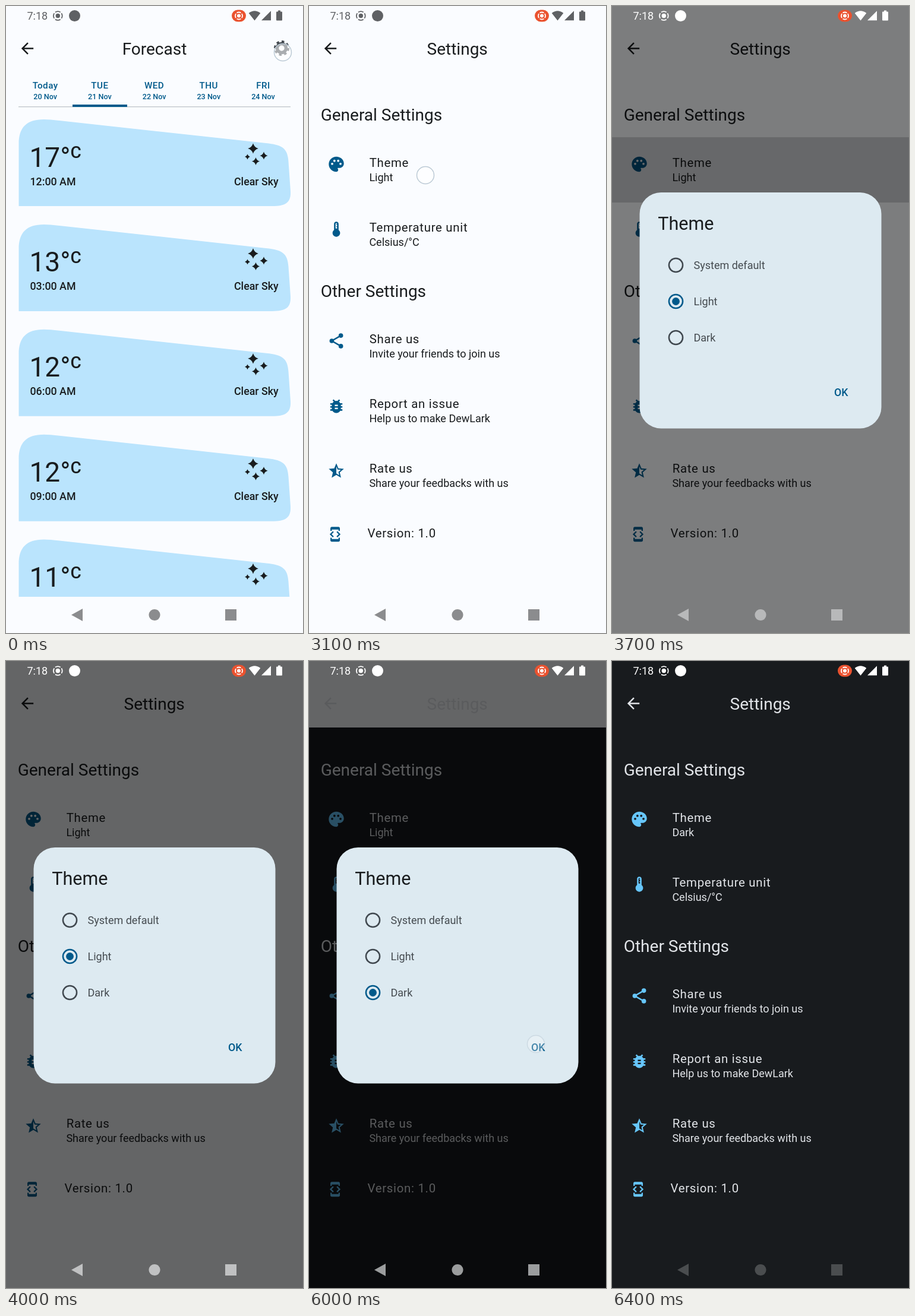
Animation, 500 px wide and 1056 px high, one loop 8 s. Source, as an HTML page:

```html
<!DOCTYPE html>
<html lang="en">
<head>
<meta charset="utf-8">
<title>Theme settings</title>
<style>
  html, body { margin: 0; width: 100%; height: 100%; overflow: hidden; }
  svg { display: block; width: 100vw; height: 100vh; background: var(--bg); font-family: Roboto, sans-serif; }
  .ink { fill: var(--ink); }
  .accent { fill: var(--accent); }
  .status { fill: var(--status); }
  .nav { fill: var(--nav); }
  .medium { font-weight: 500; }
  .title { font-size: 28px; }
  .item { font-size: 20.4px; letter-spacing: .7px; }
  .note { font-size: 18px; }
  .middle { text-anchor: middle; }
</style>
</head>
<body>
<svg id="stage" viewBox="0 0 500 1056"></svg>
<script>
const LOOP = 8000, STEP = 100;
const LIGHT = { bg: '#fafcff', ink: '#191c1e', accent: '#005a8b' };
const DARK = { bg: '#181b1e', ink: '#e1e4e8', accent: '#66c6fb' };

const text = (x, y, content, cls = 'ink', extra = '') =>
  `<text x="${x}" y="${y}" class="${cls}" ${extra}>${content}</text>`;
const circle = (x, y, r, extra = '') => `<circle cx="${x}" cy="${y}" r="${r}" ${extra}/>`;
const rect = (x, y, w, h, extra = '') => `<rect x="${x}" y="${y}" width="${w}" height="${h}" ${extra}/>`;
const dot = (x, y, r) => `M${x - r} ${y}a${r} ${r} 0 1 0 ${2 * r} 0a${r} ${r} 0 1 0 ${-2 * r} 0z`;
// Icons live on a 24 unit grid and are placed by their centre.
const icon = (d, x, y, cls = 'accent', scale = 1.273, extra = '') =>
  `<path class="${cls}" fill-rule="evenodd" transform="translate(${x} ${y}) scale(${scale}) translate(-12 -12)" d="${d}" ${extra}/>`;

const ICONS = {
  back: 'M20 11H7.83l5.59-5.59L12 4l-8 8 8 8 1.41-1.41L7.83 13H20z',
  palette: 'M12 2C6.49 2 2 6.49 2 12s4.49 10 10 10c1.38 0 2.5-1.12 2.5-2.5 0-.61-.23-1.2-.64-1.67-.08-.1-.13-.21-.13-.33 0-.28.22-.5.5-.5H16c3.31 0 6-2.69 6-6 0-4.96-4.49-9-10-9z' +
    dot(6.5, 11.5, 1.5) + dot(9.5, 7.5, 1.5) + dot(14.5, 7.5, 1.5) + dot(17.5, 11.5, 1.5),
  thermometer: 'M15 13V5c0-1.66-1.34-3-3-3S9 3.34 9 5v8c-1.21.91-2 2.37-2 4 0 2.76 2.24 5 5 5s5-2.24 5-5c0-1.63-.79-3.09-2-4zM11 5c0-.55.45-1 1-1s1 .45 1 1h-1v1h1v2h-1v1h1v2h-2z',
  share: dot(18, 5, 3) + dot(6, 12, 3) + dot(18, 19, 3),
  bug: 'M20 8h-2.81c-.45-.78-1.07-1.45-1.82-1.96L17 4.41 15.59 3l-2.17 2.17a6 6 0 0 0-2.83 0L8.41 3 7 4.41l1.62 1.63C7.88 6.55 7.26 7.22 6.81 8H4v2h2.09L6 11v1H4v2h2v1l.09 1H4v2h2.81a6 6 0 0 0 10.38 0H20v-2h-2.09L18 15v-1h2v-2h-2v-1l-.09-1H20zM14 16h-4v-2h4zM14 12h-4v-2h4z',
  star: 'M22 9.24l-7.19-.62L12 2 9.19 8.63 2 9.24l5.46 4.73L5.82 21 12 17.27 18.18 21l-1.63-7.03zM12 15.4V6.1l1.71 4.04 4.38.38-3.32 2.88 1 4.28z',
  version: 'M7 5h10v2h2V3c0-1.1-.9-2-2-2H7c-1.1 0-2 .9-2 2v4h2zM15.41 16.59L20 12l-4.59-4.59L14 8.83 17.17 12 14 15.17zM10 15.17L6.83 12 10 8.83 8.59 7.41 4 12l4.59 4.59zM17 19H7v-2H5v4c0 1.1.9 2 2 2h10c1.1 0 2-.9 2-2v-4h-2z'
};

function sparkle(x, y, r) {
  const c = r * .22;
  return `M${x} ${y - r}Q${x + c} ${y - c} ${x + r} ${y}Q${x + c} ${y + c} ${x} ${y + r}` +
    `Q${x - c} ${y + c} ${x - r} ${y}Q${x - c} ${y - c} ${x} ${y - r}z`;
}

function card([degrees, time], index) {
  const sparkles = sparkle(416, 240, 8.8) + sparkle(434, 252, 6.6) + sparkle(406.5, 254, 4.4) + sparkle(420.5, 261.5, 6.6);
  return `<g transform="translate(0 ${index * 176.9})">
    <path fill="#bae4fd" d="M21.5 337V232C21.5 205 34 191 64 191Q74 191 90 193L438 231C466 234 474 240 475.5 262L479 312C480 331 471 337 448 337z"/>
    ${text(39.5, 270.5, `${degrees}°<tspan font-size="28" class="medium" dy="-14.5">C</tspan>`, 'ink', 'font-size="46"')}
    ${text(40.5, 301.5, time, 'ink medium', 'font-size="17.8"')}
    <path class="ink" d="${sparkles}"/>
    ${text(458.7, 301.5, 'Clear Sky', 'ink medium', 'font-size="17.8" text-anchor="end"')}
  </g>`;
}

function forecastScreen() {
  const tabs = ['Today', 'TUE', 'WED', 'THU', 'FRI'].map((day, i) => {
    const x = 66.2 + i * 91.7;
    return text(x, 138.5, day, 'accent medium middle', 'font-size="15.2" letter-spacing=".5"') +
      text(x, 156.5, `${20 + i} Nov`, 'accent medium middle', 'font-size="12.6"');
  }).join('');
  const cards = [[17, '12:00 AM'], [13, '03:00 AM'], [12, '06:00 AM'], [12, '09:00 AM'], [11, '12:00 PM']];
  return text(250, 82, 'Forecast', 'ink title middle') +
    `<g fill="none" stroke="#444a50">
      ${circle(464, 71, 7.5, 'stroke-width="5.5"')}
      ${circle(464, 71, 11, 'stroke-width="4" pathLength="16" stroke-dasharray="1"')}
    </g>` + tabs +
    rect(21, 169, 458, 1.4, 'fill="#c3c8cd"') + rect(112, 166, 92, 4, 'class="accent"') +
    `<g clip-path="url(#list)">${cards.map(card).join('')}</g>`;
}

function settingsScreen() {
  const row = (y, name, note, id = '') =>
    text(101.7, y, name, 'ink item') + text(101.4, y + 24, note, 'ink note', id);
  return text(19.7, 193, 'General Settings', 'ink title') +
    icon(ICONS.palette, 46, 266.5) + row(270.7, 'Theme', 'Light', 'id="themeName"') +
    icon(ICONS.thermometer, 46, 376) + row(380, 'Temperature unit', 'Celsius/°C') +
    text(19.7, 490, 'Other Settings', 'ink title') +
    icon(ICONS.share, 46, 564) +
    icon('M18 5L6 12L18 19', 46, 564, '', 1.273, 'fill="none" stroke="var(--accent)" stroke-width="2"') +
    row(567.5, 'Share us', 'Invite your friends to join us') +
    icon(ICONS.bug, 46, 674) + row(677, 'Report an issue', 'Help us to make DewLark') +
    icon(ICONS.star, 46, 783) + row(786.3, 'Rate us', 'Share your feedbacks with us') +
    icon(ICONS.version, 44, 889.7, 'accent', 1.14) + text(98.5, 895.3, 'Version: 1.0', 'ink item');
}

function dialog() {
  const options = ['System default', 'Light', 'Dark'].map((name, i) => {
    const y = 436.5 + i * 61;
    return circle(107.5, y, 11.6, `id="ring${i}" fill="none" stroke-width="2.5"`) +
      circle(107.5, y, 0, `id="dot${i}" fill="${LIGHT.accent}"`) +
      text(137.5, y + 6.7, name, 'note', 'fill="#454b50"');
  }).join('');
  return rect(46.5, 314, 407, 397.5, 'rx="36" fill="#ddeaf1"') +
    text(77.3, 377, 'Theme', '', `font-size="30.5" fill="${LIGHT.ink}"`) +
    circle(107.5, 558.5, 0, 'id="radioRipple" fill="#27313a"') + options +
    text(374, 657, 'OK', 'medium', `font-size="17.8" fill="${LIGHT.accent}"`);
}

function systemBars() {
  const target = (x, r, color) => circle(x, 16.5, r * .5, `fill="${color}"`) +
    circle(x, 16.5, r, `fill="none" stroke="${color}" stroke-width="1.8" pathLength="8" stroke-dasharray="1.6 .4" stroke-dashoffset=".8"`);
  return text(35.5, 23, '7:18', 'status', 'font-size="18"') + target(87.3, 7.4, 'var(--status)') +
    circle(115.5, 16.5, 9.5, 'class="status"') +
    rect(380, 6.5, 24, 20, 'rx="10" fill="#ea522f"') + target(392, 6, '#fff') +
    `<path class="status" d="M418.5 24.5L408.7 12Q418.5 4.5 428.3 12zM430 24.3H446V8.3zM458 7.5h4v2h2q1 0 1 1v13q0 1-1 1h-8q-1 0-1-1v-13q0-1 1-1h2z"/>` +
    `<path class="nav" d="M110 1025.5L129 1015V1036z"/>` +
    circle(250, 1025.5, 9.6, 'class="nav"') + rect(369, 1016, 19, 19, 'class="nav"');
}

const stage = document.getElementById('stage');
stage.innerHTML = `
  <clipPath id="list">${rect(0, 170, 500, 825)}</clipPath>
  <clipPath id="themeRow">${rect(0, 221, 500, 110)}</clipPath>
  ${rect(0, 0, 500, 112, 'fill="var(--bar)"')}
  ${icon(ICONS.back, 36, 71.5, 'ink')}
  <g id="forecast">${forecastScreen()}</g>
  <g id="settings">${text(249.7, 82, 'Settings', 'ink title middle')}${settingsScreen()}
    <g clip-path="url(#themeRow)">${circle(196, 285, 0, 'id="rowRipple" fill="#000"')}</g></g>
  <rect id="scrim" width="500" height="1056"/>
  ${systemBars()}
  <g id="dialog">${dialog()}</g>
  ${circle(0, 0, 14.5, 'id="touch" fill="#fff" fill-opacity=".55" stroke="#bccad5" stroke-width="1.5"')}`;

const el = Object.fromEntries([...stage.querySelectorAll('[id]')].map(node => [node.id, node]));
const set = (id, attrs) => Object.entries(attrs).forEach(([key, value]) => el[id].setAttribute(key, value));
const cssVar = (name, value) => stage.style.setProperty('--' + name, value);
const ramp = (t, from, to) => Math.min(1, Math.max(0, (t - from) / (to - from)));
const easeOut = p => 1 - (1 - p) ** 2;
function mix(a, b, p) {
  const channel = (hex, i) => parseInt(hex.slice(1 + 2 * i, 3 + 2 * i), 16);
  return `rgb(${[0, 1, 2].map(i => Math.round(channel(a, i) + (channel(b, i) - channel(a, i)) * p))})`;
}

// start, end, x, y, opacity
const TOUCHES = [
  [0, 100, 466, 78, 1], [3100, 3300, 196, 285, 1],
  [4800, 5000, 130, 576, 1], [5900, 6100, 382, 645, .5]
];

function draw(t) {
  const isDark = t >= 6000;
  const theme = isDark ? DARK : LIGHT;
  const dim = easeOut(ramp(t, 3400, 3900)) * (1 - ramp(t, 6000, 6400) * (t > 6000));
  Object.entries(theme).forEach(([name, value]) => cssVar(name, value));
  cssVar('bar', mix(LIGHT.bg, DARK.bg, ramp(t, 6000, 6400)));
  cssVar('status', isDark ? '#ffffff' : mix('#5f6164', '#ffffff', Math.min(1, dim * 1.3)));
  cssVar('nav', isDark ? mix('#4a4d4f', '#9b9d9e', dim) : mix('#8b8c8e', '#c0c1c2', dim));

  const entered = ramp(t, 0, 400);
  set('forecast', { opacity: 1 - entered });
  set('settings', { opacity: entered });
  el.themeName.textContent = t >= 6100 ? 'Dark' : 'Light';
  set('rowRipple', { r: 330 * ramp(t, 3100, 3500), opacity: .16 * (1 - ramp(t, 3700, 4000)) });
  set('scrim', { opacity: .6 * dim });

  const opened = easeOut(ramp(t, 3400, 3700));
  const scale = .9 + .1 * opened;
  set('dialog', {
    opacity: opened * (1 - ramp(t, 6000, 6200)),
    transform: `translate(250 513) scale(${scale}) translate(-250 -513)`
  });

  const picked = ramp(t, 4900, 5100);
  [0, 1 - picked, picked].forEach((amount, i) => {
    set('dot' + i, { r: 6.4 * amount });
    set('ring' + i, { stroke: mix('#40484f', LIGHT.accent, amount) });
  });
  set('radioRipple', { r: 25.5 * ramp(t, 4800, 5100), opacity: .13 * (1 - ramp(t, 5400, 5700)) });

  const touch = TOUCHES.find(([start, end]) => t >= start && t < end);
  set('touch', touch ? { cx: touch[2], cy: touch[3], opacity: touch[4] } : { opacity: 0 });
}

const started = performance.now();
function tick() {
  const t = (performance.now() - started) % LOOP;
  draw(Math.floor(t / STEP) * STEP);
  requestAnimationFrame(tick);
}
tick();
</script>
</body>
</html>
```
